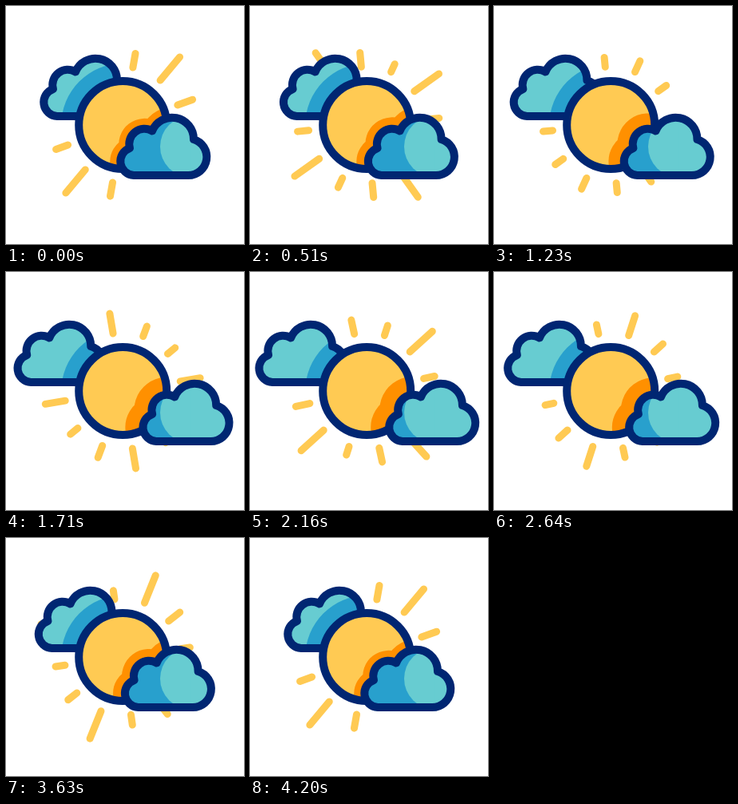
An HTML page with a canvas for the animation above (5.4 s loop, 298 by 298 pixels).

```html
<!DOCTYPE html>
<html lang="en">
<head>
<meta charset="utf-8">
<title>Sun and clouds</title>
<style>
  html, body { margin: 0; width: 100%; height: 100%; overflow: hidden; background: #fff; }
  canvas { display: block; }
</style>
</head>
<body>
<canvas id="stage"></canvas>
<script>
const SIZE = 298, LOOP = 5400, MOVE = 4200, STEP = 30;
const NAVY = '#002672', YELLOW = '#ffca53', ORANGE = '#ff9000';
const LIGHT = '#67ccd1', BLUE = '#28a0cd';
const SUN = { x: 146.2, y: 149, r: 55 };

const canvas = document.getElementById('stage');
const ctx = canvas.getContext('2d');
const ratio = window.devicePixelRatio || 1;
canvas.width = canvas.height = Math.round(SIZE * ratio);
canvas.style.width = canvas.style.height = SIZE + 'px';

const cloud = new Path2D(
  'M160 212 H228 A23 23 0 0 0 235 167 A27 27 0 0 0 183 156.5 ' +
  'A19 19 0 0 0 155 178 A17.5 17.5 0 0 0 160 212 Z');

// Ray lengths, clockwise from the top: shortest, longest, at rest
const LONG = [14, 38, 38], LONG_HIDDEN = [14, 38, 0];
const MEDIUM_HIDDEN = [12, 18, 0], SHORT_HIDDEN = [12, 12, 0];
const RAYS = [
  [11, 11, 18], LONG, [14, 18, 20], SHORT_HIDDEN, LONG_HIDDEN, MEDIUM_HIDDEN,
  [12, 13, 17.5], LONG, [13, 14, 16], SHORT_HIDDEN, LONG_HIDDEN, MEDIUM_HIDDEN
];

// Keys are [time, value]
const PULSE = [[0, 1], [450, 1], [1350, 0], [2100, 1], [2200, 1], [3080, 0], [3700, 1], [4200, 1]];
const REST = [[0, 1], [400, 0], [3700, 0], [4200, 1]];

const mix = (a, b, k) => a + (b - a) * k;
const ease = p => p * p * (3 - 2 * p);

function track(keys, t) {
  let i = 1;
  while (i < keys.length - 1 && t > keys[i][0]) i++;
  const [t0, a] = keys[i - 1], [t1, b] = keys[i];
  return mix(a, b, ease((t - t0) / (t1 - t0)));
}

function disc(x, y, r, color) {
  ctx.beginPath();
  ctx.arc(x, y, r, 0, Math.PI * 2);
  ctx.fillStyle = color;
  ctx.fill();
}

function drawRays(t) {
  const pulse = track(PULSE, t), rest = track(REST, t);
  const turn = 10 + 360 * ease(t / MOVE);
  ctx.strokeStyle = YELLOW;
  ctx.lineWidth = 9;
  ctx.lineCap = 'round';
  RAYS.forEach(([low, high, still], i) => {
    const length = mix(mix(low, high, pulse), still, rest);
    if (length < 0.5) return;
    ctx.save();
    ctx.translate(SUN.x, SUN.y);
    ctx.rotate((turn + i * 30) * Math.PI / 180);
    ctx.beginPath();
    ctx.moveTo(0, -73);
    ctx.lineTo(0, -73 - length);
    ctx.stroke();
    ctx.restore();
  });
}

// The shading stays on the stage while the cloud slides across it
function drawCloud(dx, dy, base, shade) {
  ctx.save();
  ctx.translate(dx, dy);
  ctx.save();
  ctx.clip(cloud);
  ctx.translate(-dx, -dy);
  ctx.fillStyle = base;
  ctx.fillRect(0, 0, SIZE, SIZE);
  shade();
  ctx.restore();
  ctx.strokeStyle = NAVY;
  ctx.lineWidth = 10;
  ctx.lineJoin = 'round';
  ctx.stroke(cloud);
  ctx.restore();
}

function drawSun(shift, swing) {
  disc(SUN.x, SUN.y, SUN.r, YELLOW);
  ctx.save();
  ctx.beginPath();
  ctx.arc(SUN.x, SUN.y, SUN.r, 0, Math.PI * 2);
  ctx.clip();
  ctx.translate(shift, 0);
  ctx.fillStyle = ctx.strokeStyle = ORANGE;
  ctx.lineWidth = 2 * mix(13, 23, swing);
  ctx.lineJoin = 'round';
  ctx.fill(cloud);
  ctx.stroke(cloud);
  ctx.restore();
  ctx.beginPath();
  ctx.arc(SUN.x, SUN.y, SUN.r, 0, Math.PI * 2);
  ctx.strokeStyle = NAVY;
  ctx.lineWidth = 10;
  ctx.stroke();
}

function draw(t) {
  const half = MOVE / 2;
  const swing = ease(1 - Math.abs(t - half) / half);
  const right = 31 * swing, left = -96 - 36 * swing;

  ctx.setTransform(ratio, 0, 0, ratio, 0, 0);
  ctx.fillStyle = '#fff';
  ctx.fillRect(0, 0, SIZE, SIZE);

  drawRays(t);
  drawCloud(left, -74, LIGHT, () => disc(SUN.x, SUN.y, 77, BLUE));
  drawSun(right, swing);
  drawCloud(right, 0, BLUE, () => {
    disc(231.5, 176, 38.5, LIGHT);
    ctx.fillRect(231.5, 130, 66, 90);
  });
}

function tick(now) {
  const t = Math.floor((now % LOOP) / STEP) * STEP;
  draw(Math.min(t, MOVE));
  requestAnimationFrame(tick);
}

draw(0);
let start;
requestAnimationFrame(function begin(now) {
  start = now;
  const loop = time => {
    tickAt(time - start);
    requestAnimationFrame(loop);
  };
  loop(now);
});

function tickAt(elapsed) {
  const t = Math.floor((elapsed % LOOP) / STEP) * STEP;
  draw(Math.min(t, MOVE));
}
</script>
</body>
</html>
```
